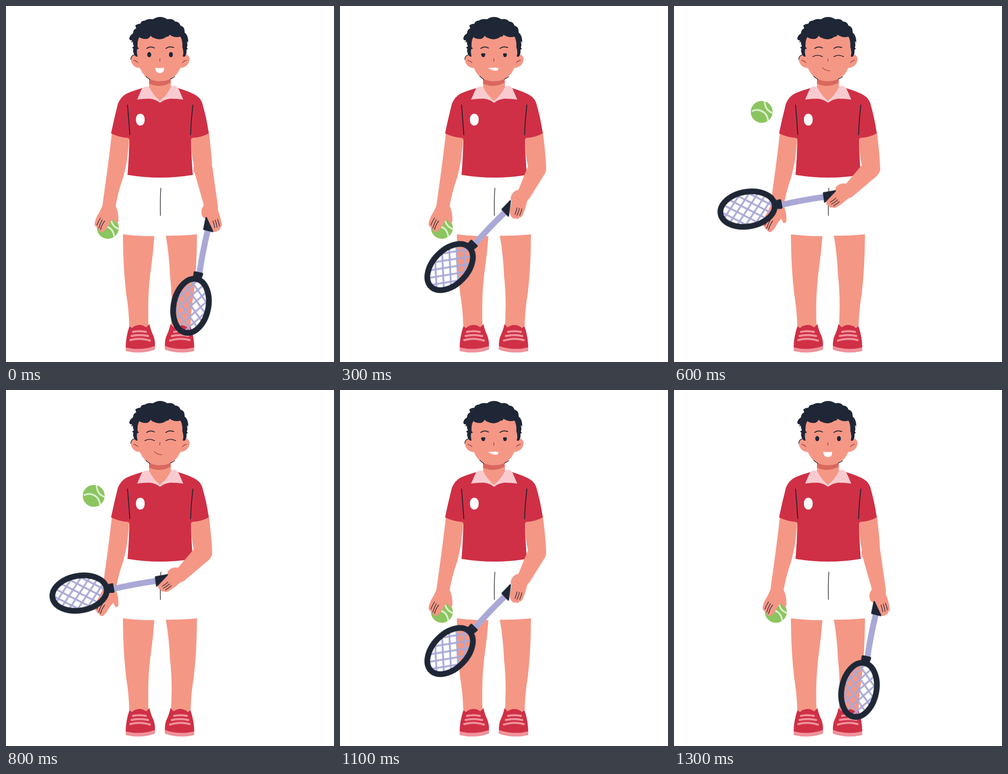
These frames come from a looping animation (718x780 px, 1.4 s). An HTML page without scripts:

```html
<!DOCTYPE html>
<html lang="en">
<head>
<meta charset="utf-8">
<title>Tennis player</title>
<style>
html, body { margin: 0; width: 100%; height: 100%; overflow: hidden; background: #fff; }
svg { display: block; width: 100%; height: 100%; }

.skin { fill: #f59785; }
.red { fill: #cf3046; }
.navy { fill: #1f2736; }
.pink { fill: #f9cbd0; }
.white { fill: #fff; }
.line { fill: none; stroke: #2a2430; stroke-width: 2; stroke-linecap: round; }
.thin { stroke-width: 1.4; }
.blush { stroke: #b94a50; stroke-width: 1.6; }

.move, .mood { animation: 1.4s step-end infinite; }
.racket { animation-name: racket; }
.ball { animation-name: ball; }
.forearm { animation-name: forearm; }
.hand { animation-name: hand; }
.grin { animation-name: grin; }
.smirk { animation-name: smirk; }
.shut { animation-name: shut; }
.half { animation-name: half; }
.lips { animation-name: lips; }

/* Swing up, then back through the same poses */
@keyframes racket {
  0%, 92.85%, 100% { transform: translate(405px, 657px) rotate(11.5deg); }
  14.28%, 85.71% { transform: translate(318px, 620px) rotate(28deg); }
  21.42%, 78.57% { transform: translate(241px, 572px) rotate(44deg); }
  28.57%, 71.42% { transform: translate(207px, 541px) rotate(54deg); }
  35.71%, 64.28% { transform: translate(177px, 506.5px) rotate(64deg); }
  42.85%, 57.14% { transform: translate(161px, 445px) rotate(80deg); }
  50% { transform: translate(160px, 409px) rotate(91deg); }
}
@keyframes ball {
  0%, 78.57%, 100% { transform: translate(223px, 486px); }
  28.57%, 71.42% { transform: translate(203px, 440px); }
  35.71%, 64.28% { transform: translate(184px, 364px); }
  42.85%, 57.14% { transform: translate(192px, 232px); }
  50% { transform: translate(200px, 62px); }
}
@keyframes forearm {
  0%, 92.85%, 100% { transform: rotate(-12deg) scaleY(.86); }
  14.28%, 85.71% { transform: rotate(8deg) scaleY(.74); }
  21.42%, 78.57% { transform: rotate(27deg) scaleY(.66); }
  28.57%, 71.42% { transform: rotate(37deg) scaleY(.7); }
  35.71%, 64.28% { transform: rotate(46deg) scaleY(.73); }
  42.85%, 57.14% { transform: rotate(45deg) scaleY(.7); }
  50% { transform: rotate(46deg) scaleY(.68); }
}
@keyframes hand {
  0%, 92.85%, 100% { transform: translate(449px, 440px); }
  14.28%, 85.71% { transform: translate(421px, 428px) rotate(17deg); }
  21.42%, 78.57% { transform: translate(401px, 414px) rotate(33deg); }
  28.57%, 71.42% { transform: translate(389px, 411px) rotate(44deg); }
  35.71%, 64.28% { transform: translate(379px, 408px) rotate(54deg); }
  42.85%, 57.14% { transform: translate(382px, 406px) rotate(69deg); }
  50% { transform: translate(383px, 403px) rotate(77deg); }
}
@keyframes grin {
  0%, 92.85%, 100% { visibility: visible; }
  14.28% { visibility: hidden; }
}
@keyframes smirk {
  0%, 28.57%, 92.85%, 100% { visibility: hidden; }
  14.28%, 78.57% { visibility: visible; }
}
@keyframes half {
  0%, 42.85%, 92.85%, 100% { visibility: hidden; }
  14.28%, 64.28% { visibility: visible; }
}
@keyframes lips {
  0%, 78.57%, 100% { visibility: hidden; }
  28.57% { visibility: visible; }
}
@keyframes shut {
  0%, 64.28%, 100% { visibility: hidden; }
  42.85% { visibility: visible; }
}
</style>
</head>
<body>
<svg viewBox="0 0 718 780" xmlns="http://www.w3.org/2000/svg">
  <defs>
    <pattern id="net" width="20" height="26" patternUnits="userSpaceOnUse" patternTransform="rotate(-5) scale(1.07 .92)">
      <path d="M-4-5.2L24 31.2M24-5.2L-4 31.2M-3 3.9L3-3.9M17 29.9L23 22.1M-3 22.1L3 29.9M17-3.9L23 3.9" stroke="#a9a8d6" stroke-width="3.8"/>
    </pattern>
    <clipPath id="disc"><circle r="24"/></clipPath>
    <g id="shoe">
      <path fill="#f0929a" d="M262 744L326 741Q327 748 326 753Q295 764 262 756Z"/>
      <path class="red" d="M270 702L276 705Q292 693 307 704L314 697Q317 711 322 721Q327 733 326 745Q294 756 262 748Q262 726 270 702Z"/>
      <path d="M278 714Q292 711 306 714M275 723Q292 719 311 723M272 732Q292 726 315 733" fill="none" stroke="#f0929a" stroke-width="4.6" stroke-linecap="round"/>
    </g>
  </defs>

  <!-- legs -->
  <path class="skin" d="M256 499H325Q323 535 318 570Q309 630 312 704H270Q269 665 263 630Q256 570 256 499Z"/>
  <path class="skin" d="M349 499H418Q418 570 411 630Q405 665 404 704H361Q365 640 359 590Q357 540 349 499Z"/>
  <use href="#shoe"/>
  <use href="#shoe" transform="matrix(-1 0 0 1 674 0)"/>
  <path class="white" d="M266 366L254 500Q290 505 328 504L338 460L345 503Q380 504 420 500L409 366Z"/>
  <path class="line thin" d="M339 399Q337 430 338 459"/>

  <g class="move ball">
    <circle r="24" fill="#8cc55f"/>
    <path clip-path="url(#disc)" d="M-20-2C-8-8 12-2 14 20M6-25Q7-2 26 3" fill="none" stroke="#dcf0cf" stroke-width="3.8" stroke-linecap="round"/>
  </g>

  <!-- arm at rest -->
  <path class="skin" d="M232 276Q226 330 219 380L211 438Q206 450 199 461Q194 472 194 479Q195 484 198 483Q198 489 203 489Q206 497 212 495Q218 491 222 484Q228 473 235 466L239 475Q243 477 246 472Q247 452 240 438Q246 405 256 377Q267 340 270 285Z"/>
  <path class="line thin" d="M207 464Q202 472 199 480M211 468Q206 477 203 487M216 471Q209 480 207 490"/>

  <path class="skin" d="M405 285Q405 325 412 354L451 356Q451 330 444 276Z"/>

  <!-- shirt -->
  <path class="red" d="M298 180Q277 186 264 192Q251 199 245 214Q237 245 230 279Q248 288 267 289Q270 290 270 295Q269 335 266 370Q338 382 409 370Q406 335 405 295Q405 290 408 289Q428 288 444 279Q438 240 429 211Q424 199 411 193Q397 186 377 180Z"/>
  <path class="line" d="M266 217Q269 250 271 282M409 217Q405 250 404 282"/>
  <rect class="white" x="284.500" y="236" width="19" height="26" rx="9.500" ry="11"/>

  <!-- racket arm -->
  <circle class="skin" cx="431" cy="356" r="20.500"/>
  <g transform="translate(431 356)">
    <path class="move forearm skin" d="M-20 0L-14 103H15L21 0Z"/>
  </g>
  <g class="move hand">
    <path class="skin" d="M-14-5Q-23 4-21 15Q-20 23-14 25Q-10 34-6 44Q-1 54 8 55Q13 55 14 52Q19 53 20 46Q24 44 23 36Q20 20 15 8L14-5Q0-15-14-5Z"/>
    <path class="line thin" d="M4 31Q7 38 8 46M9 29Q12 37 13 45M14 27Q17 34 18 42"/>
  </g>

  <g class="move racket">
    <path d="M3-172Q1-120 4-70" fill="none" stroke="#a9a8d6" stroke-width="13"/>
    <path class="navy" d="M-6-196L14-169L-6-170Z" stroke="#1f2736" stroke-width="3" stroke-linejoin="round"/>
    <ellipse rx="36" ry="58" fill="url(#net)"/>
    <ellipse rx="38" ry="60" fill="none" stroke="#1f2736" stroke-width="12.5"/>
    <path class="navy" d="M-7-76H10Q13-75 12-71L10-58H-8L-9-73Q-9-76-7-76Z"/>
  </g>

  <!-- neck and collar -->
  <path class="skin" d="M313 155V177L304 180L337 210L370 180L361 177V155Z"/>
  <path fill="#d9685f" d="M313 153H360V168Q337 181 313 170Z"/>
  <path class="pink" d="M287 205L297 182Q303 174 313 177Q322 195 337 208V212Q327 204 314 203Q299 203 287 205Z"/>
  <path class="pink" d="M388 205L378 182Q372 172 362 176Q353 195 337 208V212Q348 204 360 203Q375 203 388 205Z"/>

  <!-- head -->
  <path class="skin" d="M291 107Q276 103 273 116Q275 135 294 136ZM385 107Q400 103 402 116Q400 134 381 136Z"/>
  <path class="skin" d="M287 60V108Q290 140 306 155Q320 165 337 165Q356 165 369 154Q385 140 387 108V60Z"/>
  <path class="line thin" d="M306 154Q310 158 315 161M360 160Q365 158 369 155M280 107Q274 109 273 117"/>
  <path class="line thin" style="stroke:#8f4146" d="M280 119Q285 120 289 124M386 124Q390 120 395 119M337 115L336.500 121"/>
  <path class="navy" d="M288 111Q282 111 280 105Q277 98 279 94L276 91L280 88Q277 83 278 78L274 80L276 75Q270 76 270 71Q271 64 278 60Q278 52 285 49L283 43Q287 39 294 39Q296 32 304 32Q311 27 322 29Q337 19 353 29Q365 27 370 34Q379 34 382 43Q392 46 391 58Q399 64 399 80L396 77Q398 86 396 91L398 94L395 96Q396 107 391 111H387Q389 98 386 90Q387 77 382 67Q370 71 358 63Q356 68 352 67Q338 77 324 70Q319 69 317 65Q312 74 302 72Q295 71 292 68Q287 76 288 90L291 93L287 95Q286 104 288 111Z"/>
  <path class="line" d="M308 93Q316 87 325 92M350 93Q358 87 367 91"/>

  <g class="mood grin">
    <ellipse class="navy" cx="313.500" cy="106.500" rx="4.300" ry="5.800"/>
    <ellipse class="navy" cx="361" cy="106.500" rx="4.300" ry="5.800"/>
    <path class="white" d="M327 135Q337 137 346 135Q347 147 337 147Q327 147 327 135Z"/>
  </g>
  <path class="mood half navy" d="M309 104Q313 103 318 104Q318 112 314 112Q309 112 309 104ZM357 104Q361 103 365 104Q366 112 361 112Q357 112 357 104Z"/>
  <path class="mood smirk white" d="M324 136Q336 134 347 136Q347 142 341 142Q332 141 324 136Z"/>
  <path class="mood lips line blush" d="M325 135Q331 142 341 142"/>
  <path class="mood shut line" style="stroke-width:1.700" d="M304 111Q314 105 325 111M350 111Q360 105 371 111"/>
</svg>
</body>
</html>
```
